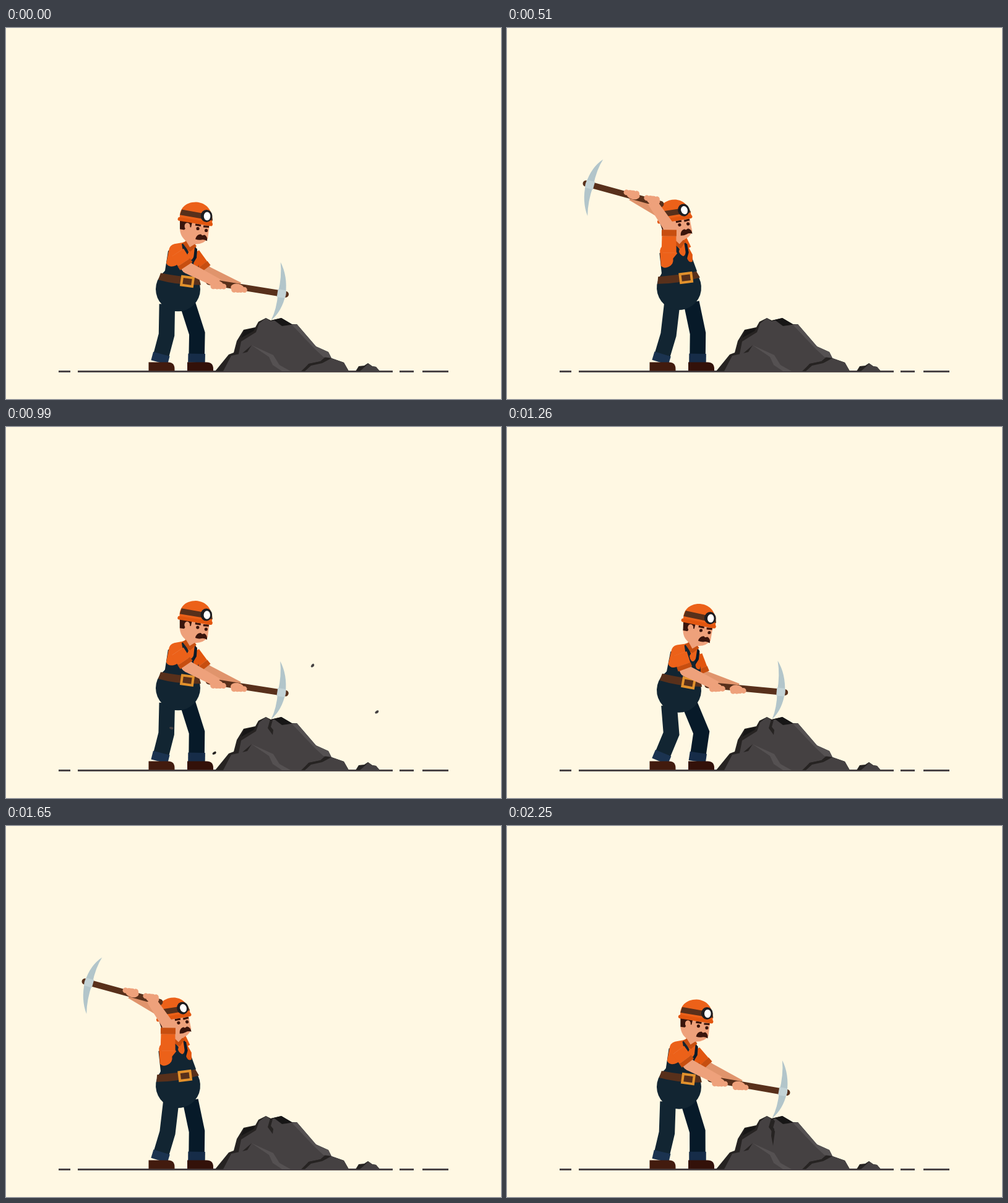
Recreate the animation shown at these times as an HTML page with a canvas. Size 800 by 600 pixels, loop 2.28 s.

```html
<!DOCTYPE html>
<html lang="en">
<head>
<meta charset="utf-8">
<title>Miner</title>
<style>
html, body { margin: 0; width: 100%; height: 100%; overflow: hidden; background: #fff8e3; }
canvas { display: block; }
</style>
</head>
<body>
<canvas id="stage" width="800" height="600"></canvas>
<script>
const ctx = document.getElementById('stage').getContext('2d');
const SWING = 1140, RAISE = 150, TOP = 560, HIT = 660, REST = 720, DIP = 1080;
const ORANGE = '#ec6119', RUST = '#c74e10', NAVY = '#122532', DARK_NAVY = '#071a29';
const SKIN = '#eea17b', SKIN_BACK = '#e0946c', WOOD = '#58301b', HAIR = '#3a150c';
const ROCK = '#454142', ROCK_DARK = '#262322', ROCK_LIGHT = '#555152';

const rad = deg => deg * Math.PI / 180;
const mix = (a, b, k) => a + (b - a) * k;
const clamp = x => Math.min(1, Math.max(0, x));
const ease = x => 0.5 - 0.5 * Math.cos(Math.PI * clamp(x));
const toward = (a, b, k) => [mix(a[0], b[0], k), mix(a[1], b[1], k)];
const polar = (o, angle, r) => [o[0] + r * Math.cos(angle), o[1] + r * Math.sin(angle)];
const rotate = ([x, y], a) => [x * Math.cos(a) - y * Math.sin(a), x * Math.sin(a) + y * Math.cos(a)];

function fill(color, d) {
  ctx.fillStyle = color;
  ctx.fill(new Path2D(d));
}
function ellipse(color, x, y, rx, ry = rx) {
  ctx.fillStyle = color;
  ctx.beginPath();
  ctx.ellipse(x, y, rx, ry, 0, 0, 7);
  ctx.fill();
}
function line(color, width, points, cap = 'butt') {
  ctx.strokeStyle = color;
  ctx.lineWidth = width;
  ctx.lineCap = cap;
  ctx.beginPath();
  points.forEach(p => ctx.lineTo(...p));
  ctx.stroke();
}
function group(x, y, angle, draw) {
  ctx.save();
  ctx.translate(x, y);
  ctx.rotate(angle);
  draw();
  ctx.restore();
}
function taper(color, a, b, wa, wb) {
  const n = Math.atan2(b[1] - a[1], b[0] - a[0]) + Math.PI / 2;
  const corners = [polar(a, n, wa / 2), polar(b, n, wb / 2), polar(b, n, -wb / 2), polar(a, n, -wa / 2)];
  fill(color, 'M' + corners.join('L') + 'Z');
}

function pose(t) {
  const late = t < RAISE ? t + SWING : t;
  let dip = 1, tilt = t < TOP ? 5.2 : 1;
  if (late >= DIP) {
    dip = ease((late - DIP) / 210);
    tilt = 10.2 - 5 * dip;
  } else if (late > REST) {
    dip = 1 - ease((late - REST) / (DIP - REST));
    tilt = 10.2 - 9.2 * dip;
  }
  const lift = 1.04 * (t < TOP
    ? ease((t - RAISE) / (TOP - RAISE))
    : 1 - clamp((t - TOP) / (HIT - TOP)) ** 2);

  const lean = rad(mix(-0.5 + 2.7 * dip, -15, lift));
  const belly = [278, 422 + mix(-0.5 + 4.5 * dip, -2, lift)];
  const onTorso = (x, y) => {
    const v = rotate([x - 278, y - 422], lean);
    return [belly[0] + v[0], belly[1] + v[1]];
  };
  const shoulder = onTorso(277, 363), backShoulder = onTorso(304, 365);

  // The tip stays in the rock until the swing lifts the front hand away.
  const low = rad(tilt), tip = rotate([-10, 45], low);
  const grip = polar([428.5 - tip[0], 472.5 - tip[1]], low, -104);
  const dx = grip[0] - shoulder[0], dy = grip[1] - shoulder[1];
  const hand = polar(shoulder,
    mix(Math.atan2(dy, dx), rad(-108), lift), mix(Math.hypot(dx, dy), 87, lift));
  const pickAngle = mix(low, rad(-164), lift);
  return { dip, lift, lean, belly, shoulder, backShoulder, hand, pickAngle,
    backHand: polar(hand, pickAngle, 34), head: polar(hand, pickAngle, 104) };
}

function arm(shoulder, hand, upper, lower, skin, shirt, cuff, width) {
  const dx = hand[0] - shoulder[0], dy = hand[1] - shoulder[1];
  const d = Math.hypot(dx, dy), reach = Math.min(d, upper + lower);
  const bend = Math.acos(clamp((upper * upper + reach * reach - lower * lower) / (2 * upper * reach)));
  const elbow = polar(shoulder, Math.atan2(dy, dx) + bend, upper);
  const hem = toward(shoulder, elbow, 0.9), seam = toward(shoulder, elbow, 0.65);
  taper(skin, shoulder, elbow, width - 2, width - 3);
  ellipse(skin, ...elbow, width / 2 - 1.5);
  taper(skin, elbow, hand, width - 3, 15);
  taper(shirt, shoulder, seam, width + 2, width + 1);
  taper(cuff, seam, hem, width + 2, width + 2);
}

function fingers(p, angle, color) {
  group(...p, angle, () => {
    ellipse(color, -2, 2.5, 11, 7);
    for (let i = 0; i < 4; i++) ellipse(color, -7 + i * 5.5, 6 - i * 0.8, 4.5);
  });
}

function leg(hip, knee, ankle, cloth, cuff) {
  ctx.lineJoin = 'miter';
  line(cloth, 25.5, [hip, knee, ankle]);
  line(cuff, 27.5, [toward(ankle, knee, 0.22), toward(ankle, knee, -0.12)]);
}

function legs({ dip, lift, belly }) {
  const x = (rest, bent, raised) => mix(mix(rest, bent, dip), raised, lift);
  const y = belly[1] + 24;
  leg([x(293, 296, 298), y], [x(307.5, 314.5, 308.5), 494], [308, 536], DARK_NAVY, '#162c48');
  leg([x(260, 262, 267), y], [x(258, 266, 261), 496], [249, 536], NAVY, '#1b3350');
  const boot = 'M0 -13H31Q42 -13 42 -2V1H0Z';
  group(293, 553.5, 0, () => fill('#331109', boot));
  group(230.5, 553.5, 0, () => fill('#421b0e', boot));
}

function torso() {
  ellipse(NAVY, 278, 422, 36);
  fill(NAVY, 'M262 360L292 350L307 354L310 370L313 404L248 404L257 392Z');
  fill(ORANGE, 'M272 349Q264 351 263 360L259 380Q262 387 271 385Q280 383 281 374L292 366L288 346Z');
  fill(ORANGE, 'M289 350L294 370Q299 380 304 368L307 352Z');
  fill('#e2560f', 'M308 355L303 380Q304 388 310 387L313 376Z');
  fill(NAVY, 'M284 349L288 347L295 362L291 370L286 360Z');
  fill(DARK_NAVY, 'M305 354L309 357L308 371L302 381Z');
  fill(SKIN, 'M289 336L308 343L307 349L298 358L290 347Z');
  fill(RUST, 'M285 347L291 344L297 354L305 349L308 352L298 361L294 359Z');
  fill(WOOD, 'M250 396Q280 402 312 404L315 415Q278 416 246 407Z');
  group(293, 409.5, rad(8), () => {
    ctx.strokeStyle = '#e2912c';
    ctx.lineWidth = 4;
    ctx.strokeRect(-9, -7, 18, 14);
  });
}

function face(closed) {
  fill(SKIN, 'M282 311L329 318L326 340Q319 350 304 349Q283 345 281 326Z');
  fill(HAIR, 'M281 310L301 313L299 322L293 320L288 326L281 325Z');
  ellipse(SKIN, 293, 320, 4.5, 5.5);
  line(HAIR, 3.2, [[306, 317.5], [315, 319]]);
  line(HAIR, 3.2, [[319, 320.5], [328, 321]]);
  if (closed) {
    line(HAIR, 1.2, [[307, 324], [313, 325]]);
    line(HAIR, 1.2, [[321, 327], [326, 327]]);
  } else {
    ellipse(HAIR, 310, 324, 2.6);
    ellipse(HAIR, 323.5, 327, 2.6);
  }
  fill(HAIR, 'M306 341Q308 333 315 333L317 335L321 334Q326 337 325 344Q320 341 316 342Q311 343 306 341Z');
  fill(ORANGE, 'M281 308C279 292 290 281 307 281C324 282 335 294 333 316Z');
  fill(WOOD, 'M284 293L333 302L334 311L281 302Z');
  line('#e2560f', 6, [[280.5, 308.5], [331, 317]], 'round');
  ellipse('#1d1d21', 324, 303.5, 9.3, 10);
  ellipse('#fff', 325, 304, 5.3, 6.8);
}

function pick() {
  line(WOOD, 10, [[-119, 0], [6.5, 0]], 'round');
  fill('#b2c5ca', 'M-10 -50Q5 -30 6.5 0Q5 28 -10 45Q-4 26 -6 0Q-4 -28 -10 -50Z');
  fill('#c3d3d6', 'M-7 -6.5H6Q8 0 6 6.5H-7Z');
}

function rocks(cracks) {
  fill(ROCK_DARK, 'M338 555L360 528L368 525L373 506L384 488L403 484L408 475L420 469L428 473L445 469' +
    'L462 479L470 479L501 515L521 524L526 534L546 541L554 555Z');
  fill('#171616', 'M380 501L385 489L403 485L400 490Z M428 473L445 469L462 479L448 483Z');
  fill(ROCK, 'M376 527L380 507L404 492L409 478L420 469L427 474L434 473L446 482L468 479L499 516' +
    'L519 530L509 539L489 543L478 555L395 555Z');
  fill(ROCK_LIGHT, 'M462 480L470 479L501 515L521 524L526 534L513 532L499 519Z');
  fill(ROCK, 'M351 555L364 530L382 526L397 513L431 531L441 545L460 555Z');
  fill(ROCK_LIGHT, 'M397 513L432 529L442 545L460 555L446 555L431 545L425 532Z');
  fill(ROCK_DARK, 'M382 526L397 513L390 524Z');
  fill(ROCK_DARK, 'M477 555L490 543L508 539L515 533L526 534L512 541L492 547L483 555Z');
  fill(ROCK, 'M483 555L493 546L511 542L526 534L546 541L554 555Z');
  fill(ROCK_DARK, 'M565 555L570 547L579 546L585 542L592 547L598 548L604 555Z');
  fill(ROCK, 'M572 555L580 548L585 543L592 547L598 548L604 555Z');
  if (cracks > 0) fill(ROCK_DARK, 'M427 473L431 474L428 485L432 490L431 498L423 487Z');
  if (cracks > 1) fill(ROCK_DARK, 'M429 474L433 477L430 488L433 494L430 517L427 501Z');
}

function ground(dt) {
  const shake = dt >= 0 ? 2 * Math.exp(-dt / 50) * Math.cos(dt * Math.PI / 50) : 0;
  const y = 555.5 + shake;
  [[85, 104], [116, 625], [636, 659], [673, 715]]
    .forEach(([a, b]) => line('#4a4446', 3, [[a, y], [b, y]]));
}

// Each chip: offset reached soon after the blow, then its angle.
const chips = [[23, -83, -60], [59, -57, -10], [59, -10, 30], [-32, -34, -5], [-56, -48, 5]];
function debris(dt) {
  if (dt <= 0 || dt > 440) return;
  const drag = (1 - Math.exp(-dt / 170)) / 0.297;
  const size = 1.15 * (1 - (dt / 440) ** 4);
  chips.forEach(([dx, dy, angle], i) => {
    const y = 472 + dy * drag + 0.0014 * dt * dt;
    if (y > 553) return;
    group(429 + dx * drag, y, rad(angle + (dt - 60) * (i % 2 ? 0.6 : -0.6)), () => {
      ctx.scale(size, size);
      fill(i === 2 || i === 3 ? ROCK_DARK : ROCK, 'M-4 -1L-1 -3L4 -2L4 1L0 2.5L-4 2Z');
    });
  });
}

function draw(now) {
  const time = now % (2 * SWING), t = time % SWING, p = pose(t);
  ctx.fillStyle = '#fff8e3';
  ctx.fillRect(0, 0, 800, 600);
  ground(t - HIT);
  rocks(time >= SWING + HIT ? 2 : time >= HIT ? 1 : 0);
  legs(p);
  arm(p.backShoulder, p.backHand, 34 + 18 * p.lift, 58 + 18 * p.lift, SKIN_BACK, '#e2560f', RUST, 18);
  group(...p.belly, p.lean, () => {
    ctx.translate(-278, -422);
    torso();
    group(297 - 3 * p.lift, 348 + p.lift, rad(-4 * p.lift), () => {
      ctx.translate(-297, -348);
      face(t > HIT - 20 && t < HIT + 220);
    });
  });
  group(...p.head, p.pickAngle, pick);
  fingers(p.backHand, p.pickAngle, SKIN);
  arm(p.shoulder, p.hand, 29 + 12 * p.lift, 56 - 6 * p.lift, SKIN, ORANGE, RUST, 22);
  fingers(p.hand, p.pickAngle, SKIN);
  debris(t - HIT);
}

const start = performance.now();
function tick() {
  draw(performance.now() - start);
  requestAnimationFrame(tick);
}
tick();
</script>
</body>
</html>
```
